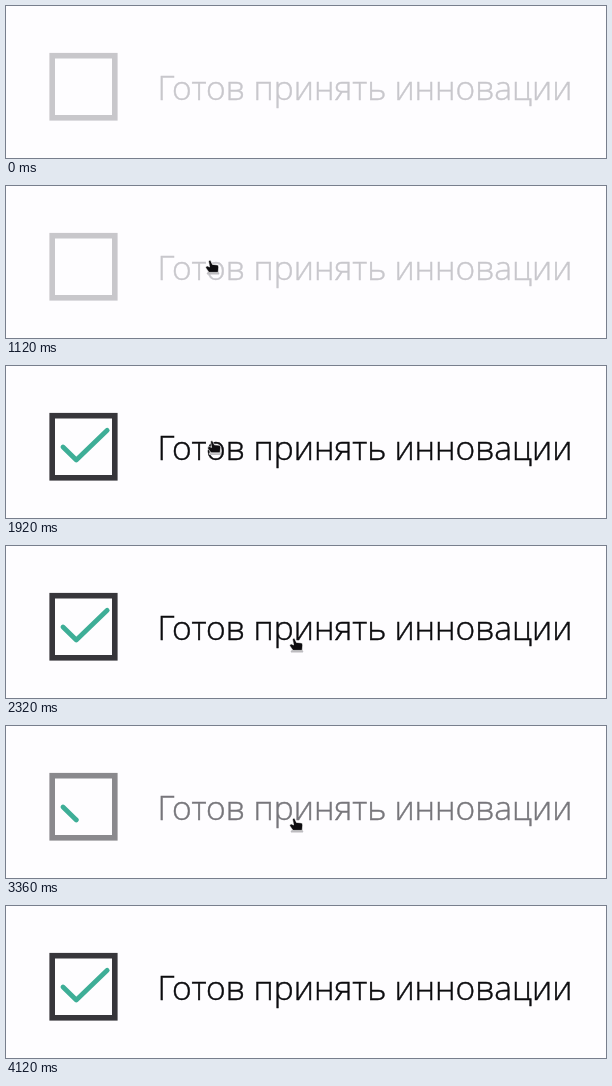
These frames come from a looping animation (600 by 152 pixels, 4.6 s). An HTML page:

```html
<!DOCTYPE html>
<html lang="ru">
<head>
<meta charset="utf-8">
<title>Checkbox</title>
<style>
html, body { margin: 0; width: 100%; height: 100%; overflow: hidden; background: #fefdff; }
svg { display: block; width: 100vw; height: 100vh; }
text { font: 300 33.6px "Open Sans", "Noto Sans", sans-serif; stroke-width: .45px; }
</style>
</head>
<body>
<svg viewBox="0 0 600 152">
  <rect id="box" x="46.2" y="49.7" width="62.6" height="62.1" fill="none" stroke-width="5.6"/>
  <path id="tick" d="M57 81L70.3 94L101.2 64.3" fill="none" stroke="#3eae97" stroke-width="4.8"
    stroke-linecap="round" stroke-linejoin="round"/>
  <text id="label" y="93.8"><tspan x="151.6">Готов</tspan> <tspan x="247.6">принять</tspan> <tspan x="388.4">инновации</tspan></text>
  <g id="arrow" stroke="#fff" stroke-width="1" stroke-linejoin="round">
    <path d="M.5 0V13.2L3.6 10.6L6 16L8.8 14.8L6.5 9.6H10.5Z" fill="#1c1b1e"/>
  </g>
  <g id="hand">
    <path d="M3 14.4H13" stroke="#bdbcc0" stroke-width="2.4" stroke-linecap="round"/>
    <path d="M3.6 2.4Q4.2 .8 5.7 1.6L7.4 5.4L12.4 5.9Q13.7 6.5 13.7 8L13.2 13.4H4L.7 8.8Q.6 6.9 2.4 7.1L4.6 8Z"
      fill="#0e0d10" stroke="#fff" stroke-width=".6" stroke-linejoin="round"/>
  </g>
</svg>
<script>
const LOOP = 4600, STEP = 40;
const $ = id => document.getElementById(id);
const box = $('box'), tick = $('tick'), label = $('label'), arrow = $('arrow'), hand = $('hand');
const tickLength = tick.getTotalLength();

const span = (t, from, to) => Math.min(1, Math.max(0, (t - from) / (to - from)));
const easeOut = (p, k) => 1 - (1 - p) ** k;
const smooth = p => p * p * (3 - 2 * p);
const mix = (a, b, p) => a + (b - a) * p;
const color = (a, b, p) => `rgb(${a.map((v, i) => Math.round(mix(v, b[i], p)))})`;

// How dark the box and label are, 0 to 1
function shade(t) {
  if (t < 2720) return easeOut(span(t, 1320, 1720), 3.8);
  if (t < 3280) return 1 - easeOut(span(t, 2720, 3040), 1.27);
  return easeOut(span(t, 3280, 3520), 1.39);
}

// How much of the tick is drawn, 0 to 1
function drawn(t) {
  if (t < 2720) return easeOut(span(t, 1320, 1720), 2.86);
  if (t < 3280) return 1 - span(t, 2720, 2820);
  return easeOut(span(t, 3280, 3520), 0.9);
}

function pointer(t) {
  if (t < 640 || t >= 3880) return null;
  const enter = span(t, 640, 1120);
  const slide = smooth(span(t, 1880, 2320));
  const leave = span(t, 3680, 3840) ** 2;
  return {
    x: 199 + 61 * (1 - enter) ** 2.2 + 84 * slide + 36 * leave,
    y: -14 + 87 * smooth(enter) ** 2.5 + 18 * slide + 21 * leave
  };
}

function place(el, pos, shown) {
  el.style.display = shown ? '' : 'none';
  if (shown) el.setAttribute('transform', `translate(${pos.x} ${pos.y})`);
}

function draw(now) {
  const t = Math.floor((now % LOOP) / STEP) * STEP;
  const dark = shade(t), part = drawn(t), pos = pointer(t);
  const ink = color([200, 199, 204], [12, 12, 15], dark);
  box.setAttribute('stroke', color([200, 199, 203], [55, 54, 59], dark));
  label.setAttribute('fill', ink);
  label.setAttribute('stroke', ink);
  tick.style.display = part > 0 ? '' : 'none';
  tick.setAttribute('stroke-dasharray', `${tickLength * part} ${tickLength * 2}`);
  const over = pos && pos.y > 47;
  place(arrow, pos, pos && !over);
  place(hand, pos, over);
}

let start;
function frame(now) {
  start ??= now;
  draw(now - start);
  requestAnimationFrame(frame);
}
draw(0);
requestAnimationFrame(frame);
</script>
</body>
</html>
```
